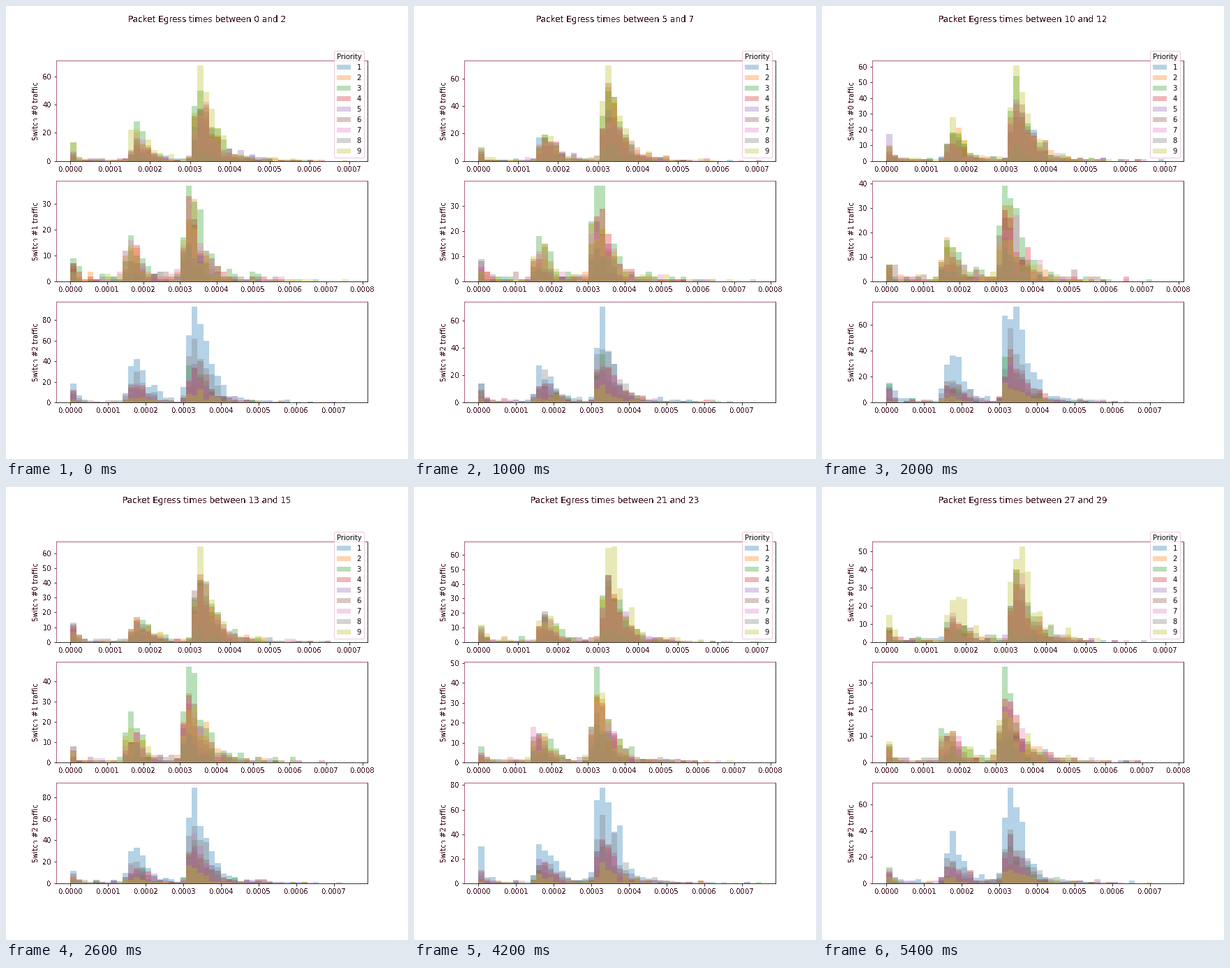
Animation of 576 by 648 pixels, one loop 5.6 s. Source, as a matplotlib script:

```python
import numpy as np
import matplotlib.pyplot as plt
from matplotlib.animation import FuncAnimation

plt.rcParams.update({
    "font.family": "DejaVu Sans",
    "font.size": 10,
    "text.antialiased": False,
    "figure.subplot.bottom": 0.125,
})

FRAMES, INTERVAL = 28, 200
BINS, PRIORITIES = 49, 9
INK, ROSE = "#401426", "#a03c5c"
KEY_TIMES = [0, 5, 10, 13, 18, 24, 27]

# span: longest delay; starts: first bins of the two bursts; echo: size of the
# early burst; share: usual priority's part of the traffic, odd: the others;
# peaks: tallest bar at the key times.
SWITCHES = [
    dict(span=7.109e-4, starts=(10, 21), echo=0.35, idle=12,
         share=0.55, odd={3: 0.72, 8: 0.15, 9: 1},
         peaks=[68, 70, 61, 65, 63, 69, 53]),
    dict(span=7.752e-4, starts=(9, 19), echo=0.42, idle=8,
         share=0.62, odd={1: 0.28, 3: 1, 5: 0.3, 8: 0.32},
         peaks=[37, 38, 39, 47, 45, 52, 36]),
    dict(span=7.519e-4, starts=(9.6, 19.8), echo=0.42, idle=16,
         share=0.4, odd={1: 1, 2: 0.2, 8: 0.6, 9: 0.17},
         peaks=[93, 70, 74, 89, 71, 84, 73]),
]


def burst(u):
    """Steep rise and slower fall, starting near u = 0, highest near u = 1."""
    x = np.log(np.maximum(u + 2, 0.01) / 3.1)
    return np.exp(-0.5 * (x / 0.42) ** 2)


def profile(sw, peak):
    """Expected packets per bin of the busiest priority."""
    b = np.arange(BINS)
    early, late = (b - s for s in sw["starts"])
    tail = np.where(late > 3, 0.1 * np.exp((4 - late) / 4), 0)
    noise = 1.1 * np.exp(-(b / 36) ** 6)
    return (sw["idle"] * np.exp(-1.5 * b) + noise
            + peak * (burst(late) + sw["echo"] * burst(early) + tail))


def simulate(sw, rng):
    """Counts by window, priority and bin; each window covers two seconds."""
    share = np.array([sw["odd"].get(p + 1, sw["share"])
                      for p in range(PRIORITIES)])
    lead = share.argmax()
    peaks = np.interp(np.arange(FRAMES + 1), KEY_TIMES, sw["peaks"]).round()
    secs = np.array([rng.poisson(np.outer(share, profile(sw, peak)) / 2)
                     for peak in peaks])
    counts = secs[:-1] + secs[1:]
    for window, peak in zip(counts, peaks):
        window[lead] = np.round(window[lead] * peak / window[lead].max())
        np.minimum(window, int(peak), out=window)
    return counts


rng = np.random.default_rng(12)
data = [simulate(sw, rng) for sw in SWITCHES]

fig, axes = plt.subplots(len(SWITCHES), 1, figsize=(8, 9), dpi=72)
title = fig.suptitle("", color=INK)
layers = []
for i, (ax, sw) in enumerate(zip(axes, SWITCHES)):
    edges = np.linspace(0, sw["span"], BINS + 1)
    layers.append([
        ax.stairs(np.zeros(BINS), edges, fill=True, color=f"C{p}",
                  alpha=0.33, linewidth=0, label=str(p + 1))
        for p in range(PRIORITIES)])
    ax.set_xlim(-0.05 * sw["span"], 1.05 * sw["span"])
    ax.set_ylabel(f"Switch #{i} traffic", color=INK)
    ax.tick_params(labelcolor=INK)
    for side in ("top", "left"):
        ax.spines[side].set_color(ROSE)

legend = axes[0].legend(title="Priority", loc="lower right",
                        edgecolor="#e6bcd8")
for text in [legend.get_title(), *legend.get_texts()]:
    text.set_antialiased(True)


def update(k):
    title.set_text(f"Packet Egress times between {k} and {k + 2}")
    for ax, steps, counts in zip(axes, layers, data):
        for step, row in zip(steps, counts[k]):
            step.set_data(row)
        ax.set_ylim(0, 1.05 * counts[k].max())
    return []


anim = FuncAnimation(fig, update, frames=FRAMES, interval=INTERVAL,
                     repeat=True, repeat_delay=0, blit=False)
plt.show()
```
